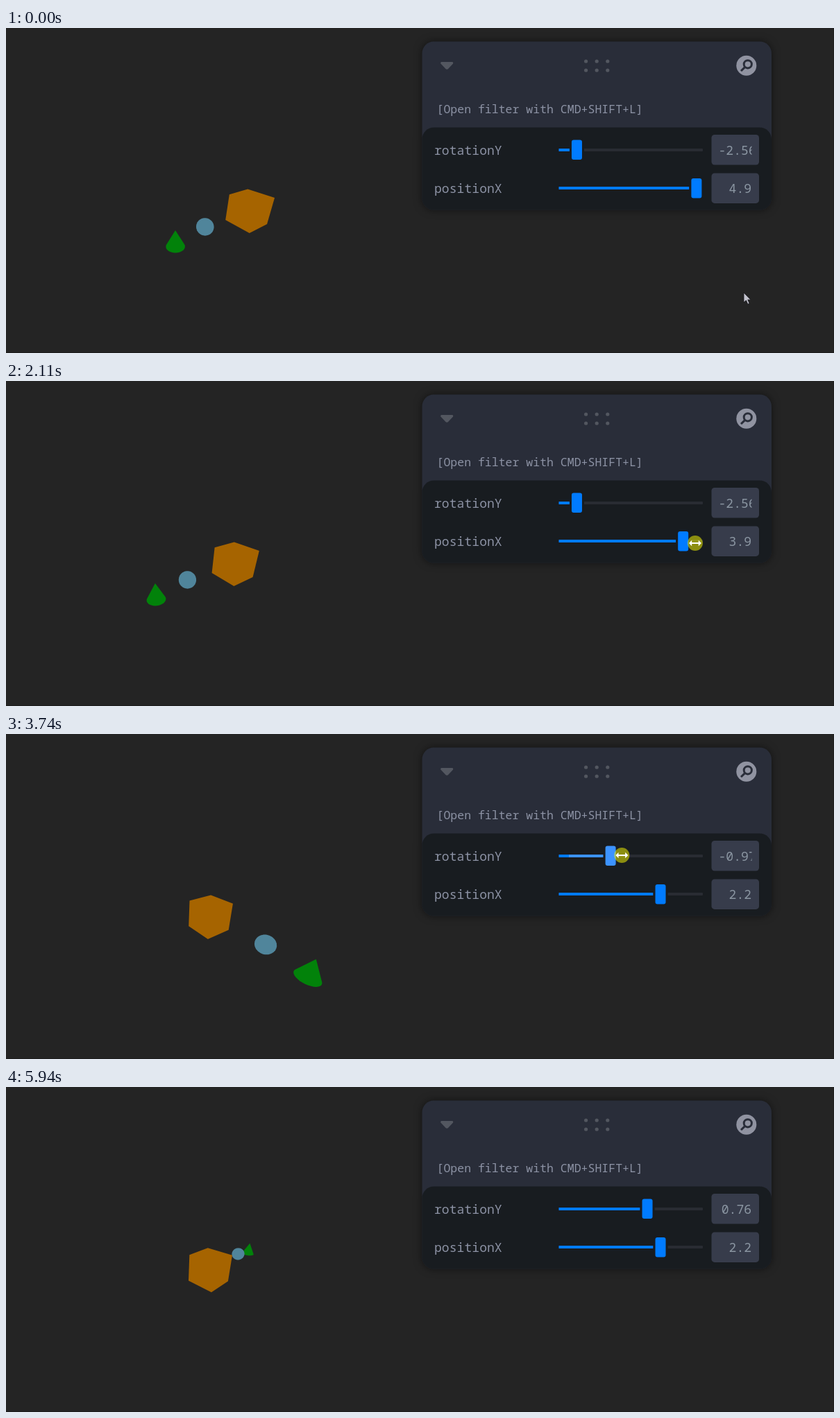
These frames come from a looping animation (1193 px wide and 469 px high, 6440 ms). An HTML page:

```html
<!DOCTYPE html>
<html lang="en">
<head>
<meta charset="utf-8">
<title>Scene controls</title>
<style>
  html, body { margin: 0; width: 100%; height: 100%; overflow: hidden; background: #242424; }
  svg { display: block; }
  text { font-family: "Noto Sans Mono", "DejaVu Sans Mono", monospace; font-size: 18.1px; fill: #8c92a4; white-space: pre; }
  .hint { font-size: 16.53px; }
  .value { fill: #8b96a2; }
  .panel { filter: drop-shadow(0 0 6px rgba(0, 0, 0, .5)); }
</style>
</head>
<body>
<svg width="1193" height="469" viewBox="0 0 1193 469">
  <defs>
    <clipPath id="view"><rect y="127.6" width="494.6" height="268.8"/></clipPath>
    <clipPath id="field"><rect x="1026" y="150" width="48.5" height="110"/></clipPath>
  </defs>
  <rect width="1193" height="469" fill="#242424"/>
  <path d="M0 468.5H1192.5V0" fill="none" stroke="#1d1d1d"/>

  <g clip-path="url(#view)">
    <polygon id="cone" fill="#02820a"/>
    <polygon id="ball" fill="#50859b"/>
    <polygon id="box" fill="#a66400"/>
  </g>

  <g class="panel">
    <rect x="599.5" y="19.5" width="503.5" height="243" rx="17" fill="#292d39"/>
    <rect x="599.5" y="143.5" width="503.5" height="119" rx="17" fill="#181c20"/>
  </g>
  <path d="M627 49H643.5Q645 50 644 51.5L637 59Q635.2 60.5 633.5 59L626.5 51.5Q625.5 50 627 49Z" fill="#535760"/>
  <g id="dots" fill="#535760"></g>
  <circle cx="1066.8" cy="54.3" r="14.5" fill="#9093a1"/>
  <g fill="none" stroke="#292d39" stroke-width="3">
    <circle cx="1068.8" cy="52.3" r="5.6"/>
    <path d="M1064.5 56.6L1059 62"/>
  </g>
  <text class="hint" x="620.5" y="123.4">[Open filter with CMD+SHIFT+L]</text>
  <g id="rows"></g>

  <path id="arrow" d="M0 0V14L3.4 11L5.8 16.5L8.2 15.5L5.8 10.2H10Z" fill="#c3c3cd" stroke="#15151a" stroke-width=".8"/>
  <g id="resize">
    <circle id="press" r="11" fill="#ff0" fill-opacity=".5"/>
    <path d="M-9 0L-4.8 -4.2V-1H4.8V-4.2L9 0L4.8 4.2V1H-4.8V4.2Z" fill="#fff"/>
  </g>
</svg>
<script>
const LOOP = 6440, STEP = 100.4, LAST = 59;
const BLUE = '#007bff', LIT = '#3c93ff';
const $ = id => document.getElementById(id);
const within = (i, from, to) => i >= from && i <= to;

// Turning points [step, value...]; every swing between them eases in and out.
const posTurns = [[9, 4.9], [16, -2.9], [22.5, 4.9], [26.7, -1.85], [32, 2.2]];
const rotTurns = [[35, -2.56], [38, -0.44], [43, -3.05], [48.4, -3.05], [52.3, 1.2], [57, 0.76]];
const pointer = [[0, 1063, 382], [5, 934, 236], [8, 994, 234], [31, 942, 234], [35, 824, 175],
  [56, 924, 172], [58, 1073, 331]];

function swing(turns, i, k = 1) {
  const n = turns.findIndex(turn => turn[0] >= i);
  if (n < 0) return turns[turns.length - 1][k];
  if (n === 0) return turns[0][k];
  const a = turns[n - 1], b = turns[n];
  const u = (i - a[0]) / (b[0] - a[0]);
  return a[k] + (b[k] - a[k]) * (1 - Math.cos(Math.PI * u)) / 2;
}

// Camera at (0, 5, 10) looking at the origin.
const DIST = Math.hypot(5, 10), SIN = 5 / DIST, COS = 10 / DIST;
const FOCAL = 233, CX = 247.3, CY = 262;

function project([x, y, z], rot, px) {
  const c = Math.cos(rot), s = Math.sin(rot);
  const wx = px + x * c + z * s, wz = z * c - x * s;
  const scale = FOCAL / (DIST - y * SIN - wz * COS);
  return [CX + wx * scale, CY - (y * COS - wz * SIN) * scale];
}

function hull(points) {
  points.sort((a, b) => a[0] - b[0] || a[1] - b[1]);
  const half = list => {
    const out = [];
    for (const p of list) {
      while (out.length > 1) {
        const [a, b] = out.slice(-2);
        if ((b[0] - a[0]) * (p[1] - a[1]) - (b[1] - a[1]) * (p[0] - a[0]) > 0) break;
        out.pop();
      }
      out.push(p);
    }
    return out.slice(0, -1);
  };
  const lower = half(points);
  return lower.concat(half(points.reverse()));
}

const ring = (cx, y, r) => Array.from({ length: 32 }, (_, k) => {
  const a = k * Math.PI / 16;
  return [cx + r * Math.cos(a), y, r * Math.sin(a)];
});
const shapes = {
  box: [-1, 1].flatMap(x => [-1, 1].flatMap(y => [-1, 1].map(z => [x, y, z]))),
  ball: Array.from({ length: 17 }, (_, k) => k * Math.PI / 16)
    .flatMap(a => ring(4, Math.cos(a) / 2, Math.sin(a) / 2)),
  cone: [[6, 0.5, 0], ...ring(6, -0.5, 0.5)]
};

for (const x of [835.6, 851.2, 866.8])
  for (const y of [48, 61]) $('dots').innerHTML += `<circle cx="${x}" cy="${y}" r="2.6"/>`;

function makeRow(label, y, unit, digits, turns) {
  const g = document.createElementNS('http://www.w3.org/2000/svg', 'g');
  const top = Math.floor(y) - 2;
  g.innerHTML = `
    <text x="617" y="${y + 6.5}">${label}</text>
    <rect x="796.5" y="${top}" width="207.5" height="4" rx="1" fill="#292c33"/>
    <rect class="fill" x="796.5" y="${top}" height="4" fill="${BLUE}"/>
    <rect class="glow" x="811" y="${top}" height="4" fill="${LIT}"/>
    <rect class="thumb" y="${y - 16}" width="18" height="31.5" rx="4.5" stroke="#181c20" stroke-width="3"/>
    <rect x="1016.5" y="${y - 22}" width="68.5" height="43.5" rx="4.5" fill="#373c4b"/>
    <g clip-path="url(#field)"><text class="value" y="${y + 6.5}"></text></g>`;
  $('rows').append(g);
  const [fill, glow, thumb, value] = ['fill', 'glow', 'thumb', 'value'].map(c => g.querySelector('.' + c));
  const valueAt = i => +swing(turns, i).toFixed(digits);
  const thumbAt = i => 900.8 + valueAt(i) * unit;
  const draw = (i, lit, glowing) => {
    const x = thumbAt(i), str = valueAt(i).toFixed(digits), long = str.length > 4;
    fill.setAttribute('width', Math.max(0, x - 807));
    glow.setAttribute('width', glowing ? Math.max(0, x - 821.5) : 0);
    thumb.setAttribute('x', x - 9);
    thumb.setAttribute('fill', lit ? LIT : BLUE);
    value.textContent = str;
    value.setAttribute('x', long ? 1026.5 : 1074.2);
    value.setAttribute('text-anchor', long ? 'start' : 'end');
  };
  return { valueAt, thumbAt, draw };
}
const rotRow = makeRow('rotationY', 176, 30.6, 2, rotTurns);
const posRow = makeRow('positionX', 231.4, 19.2, 1, posTurns);

function drawCursor(i) {
  const row = within(i, 8, 31) ? posRow : within(i, 36, 56) ? rotRow : null;
  const resize = row || within(i, 5, 7) || within(i, 34, 35);
  // While dragging, the thumb trails the pointer by one step.
  const x = row ? row.thumbAt(i + 1) : swing(pointer, i);
  const y = swing(pointer, i, 2);
  const show = (id, on) => $(id).setAttribute('visibility', on ? 'visible' : 'hidden');
  show('arrow', !resize && i < LAST);
  show('resize', resize);
  show('press', row);
  for (const id of ['arrow', 'resize']) $(id).setAttribute('transform', `translate(${x} ${y})`);
}

let shown = -1;
function draw() {
  const i = Math.min(LAST, Math.floor((performance.now() % LOOP + 1) / STEP));
  if (i !== shown) {
    shown = i;
    const rot = rotRow.valueAt(i), px = posRow.valueAt(i);
    for (const id in shapes) {
      const outline = hull(shapes[id].map(p => project(p, rot, px)));
      $(id).setAttribute('points', outline.map(p => p.map(n => n.toFixed(2))).join(' '));
    }
    rotRow.draw(i, within(i, 34, 56), within(i, 36, 42));
    posRow.draw(i);
    drawCursor(i);
  }
  requestAnimationFrame(draw);
}
draw();
</script>
</body>
</html>
```
